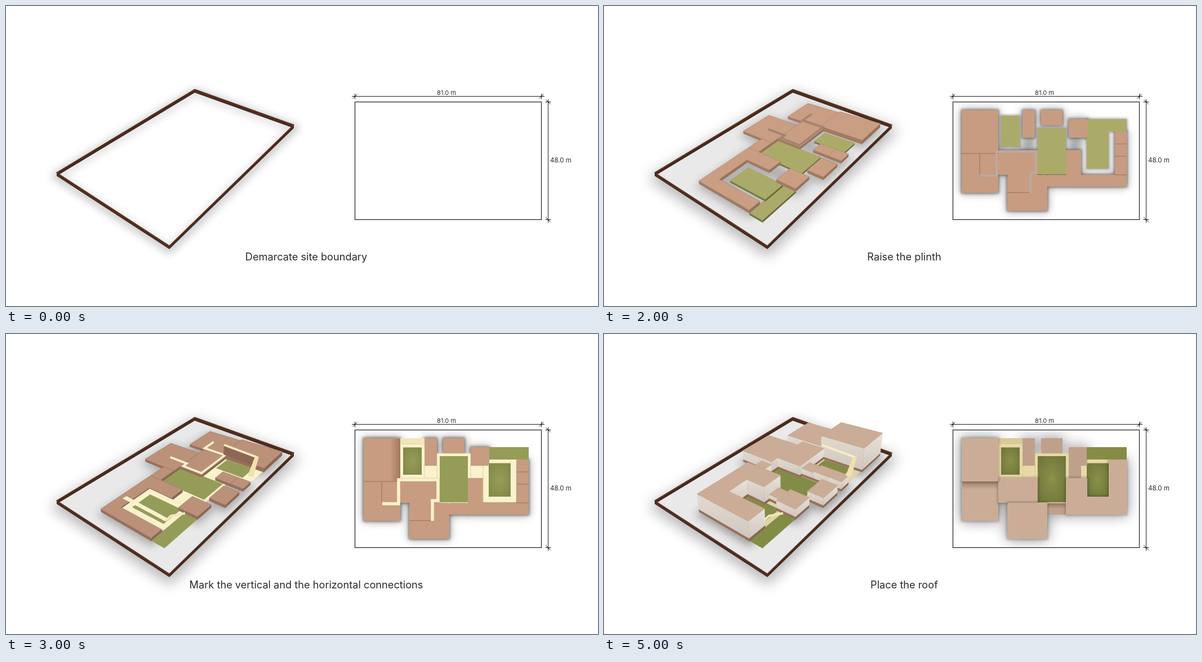
Recreate the animation shown at these times as an HTML page. Size 1051 by 533 pixels, loop 6 s.

```html
<!DOCTYPE html>
<html lang="en">
<head>
<meta charset="utf-8">
<title>Massing steps</title>
<style>
html, body { margin: 0; width: 100%; height: 100%; overflow: hidden; background: #fff; }
svg { display: block; width: 1051px; height: 533px; }
text { font-family: Inter, "Open Sans", sans-serif; fill: #2a2a2a; text-anchor: middle; }
</style>
</head>
<body>
<svg id="stage" viewBox="0 0 1051 533" xmlns="http://www.w3.org/2000/svg"></svg>
<script>
const STEP = 1000;
const captions = [
  'Demarcate site boundary', 'Incorporate the unbuilt spaces', 'Raise the plinth',
  'Mark the vertical and the horizontal connections', 'Extrude the walls', 'Place the roof'
];
const [SITE, LAWNS, PLINTH, LINKS, WALLS, ROOF] = captions.keys();

// Plan geometry: rectangles are [x, y, width, height]
const grow = ([x, y, w, h], n) => [x - n, y - n, w + 2 * n, h + 2 * n];
const trimTop = ([x, y, w, h], n = 6.5) => [x, y + n, w, h - n];
const halves = ([x, y, w, h]) => [[x, y + h / 2, w, h / 2], [x, y, w, h / 2]];
const box = ([x, y, w, h]) => [[x, y], [x + w, y], [x + w, y + h], [x, y + h]];
const outline = s => Array.isArray(s[0]) ? s : box(s);
// U-shaped wing around the eastern court
const wing = (left, right, bottom) => [
  [820, 256], [left, 256], [left, bottom], [right, bottom], [right, 223], [928, 223], [928, 321], [820, 321]
];

const lawn = { a: [705, 195, 33, 55], b: [770, 217, 50, 82], c: [857, 223, 39, 66], d: [857, 201, 71, 22] };
const court = { ...lawn, a: trimTop(lawn.a), c: trimTop(lawn.c) };
const foyer = [700, 185, 43, 14];
const links = [[743, 234, 22, 22], [825, 234, 22, 22]];
const corridor = [[668, 301.5], [697, 301.5], [697, 259], [767, 259], [767, 296], [757, 296], [757, 332]];

// Listed from far to near in the perspective
const room = (foot, height = 15, more = {}) => ({ foot, height, plinth: 4.5, ...more });
const hall = room([635, 185, 65, 77], 40, { plinth: 7 });
const west = room([635, 262, 65, 70], 22, { split: true });
const big = [
  west, hall, room([716, 300, 71, 64], 20, { split: true }), room([700, 256, 70, 44], 19),
  room([787, 300, 33, 21]), room(wing(847, 907, 300), 27, { roof: wing(858, 896, 289), pale: true })
];
const cells = [[743, 207, 22, 27], [743, 185, 22, 22], [776, 185, 38, 27], [825, 201, 33, 33]].map(r => room(r));
const volumes = [...big.slice(0, 4), room(links[0], 13), ...cells.slice(0, 2), ...big.slice(4),
  room(links[1], 10), ...cells.slice(2)];

// Plan coordinates plus height -> perspective view
function project(x, y, z = 0) {
  const u = (x - 635) / 293, v = (y - 185) / 147;
  const w = 1 - 0.2867 * u + 0.1428 * v;
  const sx = (490 - 276.7 * u - 76.3 * v) / w;
  const sy = (216 + 64 * u - 13.7 * v) / w;
  const h = z / w;
  return [sx + (sx - 330) * 0.00075 * h, sy - h];
}

const each = (list, fn) => list.map(fn).join('');
const pts = list => list.map(p => p.map(n => n.toFixed(1)).join()).join(' ');
const poly = (list, fill, extra = '') => `<polygon points="${pts(list)}" fill="${fill}" ${extra}/>`;
const trail = (list, color, width) => `<polyline points="${pts(list)}" fill="none" stroke="${color}" ` +
  `stroke-width="${width}" stroke-linejoin="miter"/>`;
const flat = (s, z, fill, extra) => poly(outline(s).map(p => project(...p, z)), fill, extra);

// Outlines run clockwise, so rightward and downward edges face the viewer
function faces(shape) {
  const o = outline(shape);
  return o.map((a, i) => {
    const b = o[(i + 1) % o.length];
    const dx = b[0] - a[0], dy = b[1] - a[1];
    return { a, b, side: dy > 0 ? 'left' : dx > 0 ? 'right' : dy < 0 ? 'backX' : 'backY',
      depth: a[0] + b[0] - a[1] - b[1] };
  }).sort((p, q) => p.depth - q.depth);
}
const wall = (f, z0, z1, fill, extra) => poly([
  project(...f.a, z0), project(...f.b, z0), project(...f.b, z1), project(...f.a, z1)
], fill, extra);

const clay = { top: '#c99e82', left: '#a27a62', right: '#97705a', edge: '#a98068' };
const clayDim = { top: '#bb917a', left: '#98705a', right: '#8a6551', edge: '#997260' };
const grass = { top: '#abab69', left: '#73763f', right: '#666a38', edge: '#9c9d5d' };
const roofing = { top: '#cbad97', left: 'url(#wallL)', right: 'url(#wallR)', edge: '#bfa18b' };
const cream = '#fbf2cd', green = '#959c58';

function solid(shape, z0, z1, c) {
  return each(faces(shape).filter(f => c[f.side]), f => wall(f, z0, z1, c[f.side])) +
    flat(shape, z1, c.top, `stroke="${c.edge}" stroke-width=".6" stroke-linejoin="round"`);
}
function openRoom(shape, z0, z1, pale) {
  const c = { left: 'url(#wallL)', right: 'url(#wallR)',
    backX: pale ? '#d6cec4' : '#b5ada4', backY: pale ? '#d9d2c8' : '#c1b9b0' };
  return flat(shape, z0, pale ? '#d3c8bc' : '#9f7963') +
    each(faces(shape), f => wall(f, z0, z1, c[f.side], 'stroke="#9d948b" stroke-width=".5"'));
}
function tower(v, closed) {
  const foot = v.roof || v.foot;
  const base = solid(foot, 0, 4, clayDim);
  if (closed) return base + solid(foot, 4, v.height, roofing);
  return base + each(v.split ? halves(foot) : [foot], s => openRoom(s, 4, v.height, v.pale));
}

// Perspective view
const corners = [[335, 148], [511, 211], [290, 426], [90, 296]];
const drop = n => corners.map(([x, y]) => [x, y + n]);
function site(step) {
  const heavy = step > LAWNS;
  const ground = drop(6);
  const beams = each(corners, (p, i) => {
    const q = corners[(i + 1) % 4];
    return poly([p, q, [q[0], q[1] + 6], [p[0], p[1] + 6]], i % 2 ? '#47291c' : '#4d2d1f');
  });
  const shade = heavy
    ? poly(drop(11), '#000', 'stroke="#000" stroke-width="14" opacity=".27" filter="url(#wide)"')
    : poly(ground, 'none', 'stroke="#000" stroke-width="12" opacity=".26" filter="url(#soft)"');
  return shade + poly(ground, heavy ? '#e9e9ea' : '#fff', heavy ? '' : 'opacity=".45"') + beams +
    trail([...corners, corners[0]], '#603a29', 1.4);
}
const groundShade = (list, strength) => `<g opacity="${strength}" filter="url(#soft)">` +
  each(list, s => flat(s, -3, '#000', 'stroke="#000" stroke-width="8"')) + '</g>';

// Bars and slopes that climb to the upper level
function ramps(walled) {
  const shade = walled ? '' : poly([[387, 198], [442, 220], [438, 234], [386, 214]], '#8d6753');
  const bar = walled ? '' : poly([[207, 292], [214, 288], [288, 328], [283, 333]], cream);
  return shade + bar + trail([[387, 197], [446, 219]], '#f7edc3', 4) +
    poly([[442, 218], [449, 218], [439, 254], [429, 252]], '#efe2ac') +
    trail([[284, 331], [293, 323], [318, 318.5]], '#f3e8b8', 4);
}
const westFlats = (c, g) => each([foyer, grow(court.a, 6), grow(lawn.b, 5), ...links], r => flat(r, 3.5, c)) +
  flat(court.a, 3, g) + flat(lawn.b, 3, g);
const eastFlats = (c, g) => flat(grow(court.c, 10), 3.5, c) + flat(court.c, 3, g) + flat(lawn.d, 1, g);

function view(step) {
  const feet = volumes.map(v => v.roof || v.foot);
  const greens = [lawn.a, lawn.b, lawn.d, lawn.c];
  const raise = (list, c) => each(list, v => solid(v.foot, 0, v.plinth, c));
  const path = color => trail(corridor.map(p => project(...p, 5)), color, 3.6);
  let s = site(step);
  if (step === LAWNS) s += groundShade(greens, 0.16);
  if (step > LAWNS) s += groundShade(feet, 0.18 + 0.03 * step);
  if (step === LAWNS || step === PLINTH) s += each(greens, g => solid(g, -2, 1, grass));
  if (step === PLINTH) s += raise(big, clay) + path('#a48372') + raise(cells, clay);
  if (step === LINKS) s += westFlats(cream, green) + raise(big, clayDim) +
    eastFlats(cream, green) + path(cream) + raise(cells, clayDim) + ramps(false);
  if (step >= WALLS) s += westFlats('#dfd3ab', '#838c46') + eastFlats('#dfd3ab', '#838c46') +
    each(volumes, v => tower(v, step === ROOF)) + ramps(true);
  return s;
}

// Plan view
const line = (x1, y1, x2, y2) => `<path d="M${x1} ${y1}L${x2} ${y2}"/>`;
const tick = (x, y, lean) => line(x - 5, y, x + 5, y) + line(x, y - 5, x, y + 5) +
  line(x - 4, y + 4 * lean, x + 4, y - 4 * lean);
const tile = (s, fill, extra) => poly(outline(s), fill, extra);
const halo = (list, blur, alpha) => `<g opacity="${alpha}" filter="url(#${blur})">` +
  each(list, s => tile(s, '#000', 'stroke="#000" stroke-width="3"')) + '</g>';
function block(shape, fill, inked) {
  if (inked) return tile(shape, fill, 'stroke="#2a1d16" stroke-width="1.1"');
  if (Array.isArray(shape[0])) return tile(shape, fill);
  return tile(grow(shape, -1.5), fill, `stroke="${fill}" stroke-width="3" stroke-linejoin="round"`);
}

function plan(step) {
  if (step === SITE) return '';
  const greens = Object.values(lawn);
  const inked = step === WALLS;
  if (step === LAWNS) return halo(greens, 'thin', 0.5) + each(greens, g => block(g, grass.top)) +
    `<g stroke="#85864b" stroke-width=".8">${line(858, 222.5, 896, 222.5)}</g>`;

  const walk = step === ROOF ? '#e8d9a7' : cream;
  const rim = inked ? 'stroke="#2a1d16"' : 'stroke="#d7c99a" stroke-width=".7"';
  const ring = (r, n) => tile(grow(r, n), walk, rim);
  const lit = step === ROOF ? 'url(#deep)' : 'url(#lawn)';
  const west = ring(lawn.b, 5) + tile(foyer, step === ROOF ? '#d9ca96' : '#f1e6ba') + ring(court.a, 6) +
    each(links, r => tile(r, walk, rim)) + tile(court.a, lit) + tile(lawn.b, step === ROOF ? lit : green);
  const east = ring(court.c, 10) + tile(court.c, lit) + tile(lawn.d, step === ROOF ? '#868c46' : green);
  const shade = halo(volumes.map(v => v.foot), step === ROOF ? 'wide' : 'soft', step === ROOF ? 0.42 : 0.35);

  if (step === ROOF) {
    const low = [...cells, big[4], volumes.find(v => v.foot === links[1])];
    const high = [big[0], big[3], big[2], big[5], hall];
    return shade + west + east + each(low, v => block(v.foot, '#bfa18b')) +
      each(high, v => halo([v.roof || v.foot], 'thin', 0.25) + block(v.roof || v.foot, roofing.top)) +
      tile([636, 262, 63, 14], 'url(#fall)') + tile([787, 301, 32, 9], 'url(#fall)') +
      tile(lawn.d, '#868c46');
  }
  const fill = '#c79c80';
  const rooms = list => each(list, v => block(v.foot, fill, inked));
  const contact = halo([...big, ...cells].map(v => v.foot), 'thin', 0.4);
  const seams = `<g stroke="${inked ? '#2a1d16' : '#8d6751'}" stroke-width=".8">` +
    each([245, 267, 300], y => line(907, y, 928, y)) + line(667, 262, 667, 299) +
    line(635, 262, 700, 262) + line(716, 331.5, 755, 331.5) + '</g>';
  if (step === PLINTH) return shade + contact + halo(greens, 'thin', 0.35) + each(greens, g => block(g, grass.top)) +
    rooms(big) + seams + trail(corridor, '#b9aaa2', 4) + rooms(cells);
  return shade + contact + west + rooms(big) + tile([682, 186, 18, 76], 'url(#edge)') + seams + east +
    trail(corridor, cream, 5.5) + rooms(cells);
}

const grad = (id, a, b, dir = 'x2="0" y2="1"') => `<linearGradient id="${id}" x1="0" y1="0" ${dir}>` +
  `<stop stop-color="${a}"/><stop offset="1" stop-color="${b}"/></linearGradient>`;
const radial = (id, a, b) => `<radialGradient id="${id}" r=".7"><stop stop-color="${a}"/>` +
  `<stop offset="1" stop-color="${b}"/></radialGradient>`;
const blur = (id, n) => `<filter id="${id}" filterUnits="userSpaceOnUse" x="0" y="0" width="1051" height="533">` +
  `<feGaussianBlur stdDeviation="${n}"/></filter>`;

const defs = '<defs>' + blur('thin', 2) + blur('soft', 8) + blur('wide', 12) +
  grad('wallL', '#e2dad1', '#d0c7bd') + grad('wallR', '#e8e2da', '#d0c7bc') +
  grad('edge', 'rgba(90,55,35,0)', 'rgba(90,55,35,.35)', 'x2="1" y2="0"') +
  grad('fall', 'rgba(80,50,35,.4)', 'rgba(80,50,35,0)') +
  radial('lawn', '#969d56', '#7f8746') + radial('deep', '#8b9149', '#6c733a') +
  '<clipPath id="site"><rect x="620" y="171" width="330" height="208"/></clipPath></defs>';

const frame = '<g fill="none" stroke="#1d1d1d">' +
  '<rect x="619.5" y="170.5" width="331" height="209" stroke-width="1.2"/>' +
  line(614, 160.5, 956, 160.5) + line(962.5, 166, 962.5, 385) +
  tick(619.5, 160.5, 1) + tick(950.5, 160.5, 1) + tick(962.5, 170.5, -1) + tick(962.5, 379.5, -1) + '</g>' +
  '<text x="782" y="158" font-size="11">81.0 m</text><text x="985" y="277.5" font-size="11.5">48.0 m</text>';

const stage = document.getElementById('stage');
stage.innerHTML = defs + each(captions, (c, i) =>
  `<g class="scene" display="none">${view(i)}<g clip-path="url(#site)">${plan(i)}</g>` +
  `<text x="533" y="452" font-size="18.2">${c}</text></g>`) + frame;

const scenes = [...stage.querySelectorAll('.scene')];
function render(ms) {
  const now = Math.floor(ms / STEP) % scenes.length;
  scenes.forEach((g, i) => g.setAttribute('display', i === now ? 'inline' : 'none'));
}
function loop() {
  render(performance.now());
  requestAnimationFrame(loop);
}
loop();
</script>
</body>
</html>
```
